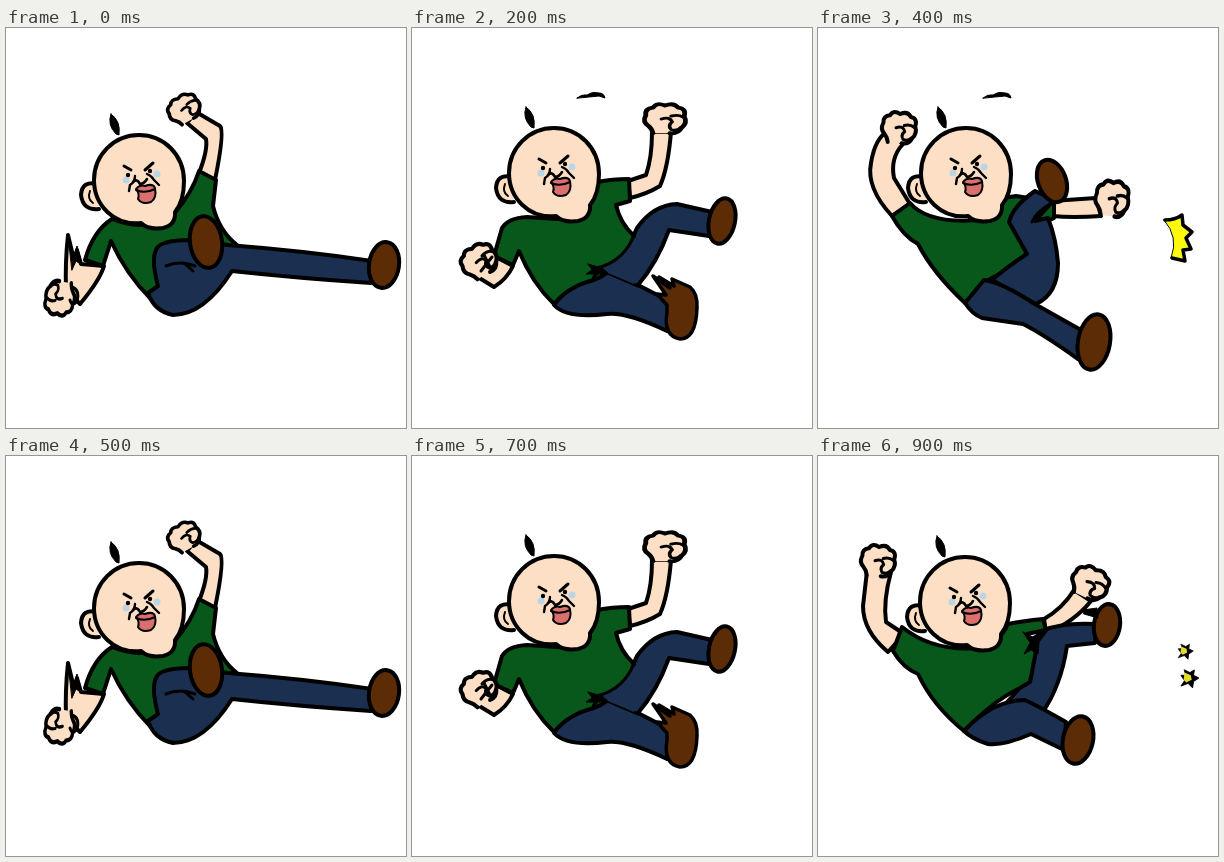
Write an HTML page that moves like this. It is 400x400 px and loops after 1 s.

```html
<!DOCTYPE html>
<html>
<head>
<meta charset="utf-8">
<style>
html, body { margin: 0; width: 100%; height: 100%; overflow: hidden; background: #fff; }
svg { display: block; width: 100vw; height: 100vh; }
</style>
</head>
<body>
<svg id="stage" viewBox="0 0 400 400" stroke="#000" stroke-width="4" stroke-linejoin="round" stroke-linecap="round"></svg>
<script>
const SKIN = '#fddfc6', SHIRT = '#07581a', JEANS = '#1b3050', SHOE = '#5b2c06', YELLOW = '#fdf90c';

const shape = (fill, d, width = 4) => `<path d="${d}" fill="${fill}" stroke-width="${width}"/>`;
const line = (d, width = 3) => shape('none', d, width);
const ink = d => shape('#000', d, 1);
const shoe = (x, y, rx, ry, turn) =>
  `<ellipse rx="${rx}" ry="${ry}" fill="${SHOE}" transform="translate(${x} ${y}) rotate(${turn})"/>`;
// Knuckles point up, the wrist is open below; sx and sy stretch the fist.
const fist = (x, y, turn, sx = 1, sy = 1) =>
  `<g transform="translate(${x} ${y}) rotate(${turn}) scale(${sx} ${sy})">` +
  shape(SKIN, 'M-10 15Q-11 10-14 7Q-19 3-16-4Q-17-11-10-12Q-7-18 0-14Q7-18 11-12Q18-11 16-3Q19 4 14 9Q11 16 4 15') +
  line('M-3 0Q4-3 6 3Q2 7 5 11Q10 13 13 9M5-3Q11-5 15-2') + '</g>';

// Head drawn around its centre; every pose only shifts it.
const head = (x, y) => `<g transform="translate(${x} ${y})">` +
  shape(SKIN, 'M-41 4Q-57 0-58 15Q-56 31-40 29') + line('M-49 11Q-52 19-46 23', 2) +
  ink('M-28-66Q-18-59-20-45L-23-46Q-32-55-28-66Z') +
  shape(SKIN, 'M0-45C25-45 45-25 45 1C45 16 41 26 36 32Q37 45 24 48Q9 50 2 43C-25 46-45 25-45 0C-45-25-25-45 0-45Z') +
  `<g fill="#bcd5e4" stroke="none"><circle cx="-13" cy="0" r="3.5"/><circle cx="18" cy="-6" r="3.5"/></g>` +
  line('M-15-14L-8-10M6-10L14-17') +
  `<g stroke="none"><circle cx="-11" cy="-5" r="2.2"/><circle cx="11" cy="-9" r="2.2"/></g>` +
  line('M-4-4Q-4 2-9 5L-10 11M8-6Q13-4 15 0L20 5', 2.4) +
  line('M-6 2Q-2-2 1 4Q5 4 8-1', 2.6) +
  shape('#d9706e', 'M-3 9Q1 4 6 6Q14 3 16 8Q18 18 12 22Q3 25-1 19Q1 14-3 9Z', 2) +
  line('M-3 10Q6 14 16 9', 2) + '</g>';

const burstLow = shape(YELLOW, 'M39 365Q56 359 67 346Q78 362 100 368L102 385L90 376Q84 378 81 384L75 376Q64 376 56 381Q57 370 39 365Z', 1) +
  line('M67 346Q56 359 39 365Q57 370 56 381Q64 376 75 376L81 384Q84 378 90 376L102 385L100 370');
const burstRight = shape(YELLOW, 'M346 192Q357 192 364 187L365 197L374 204L368 210L373 221L365 222L367 233L353 230Q361 209 346 192Z', 1) +
  line('M347 192Q357 192 364 187L365 197L374 204L368 210L373 221L365 222L367 233L354 230', 3.5);
const spark = (x, y, s) => `<g transform="translate(${x} ${y}) scale(${s})">` +
  ink('M-5-9L1-6L6-9L5-3L11 0L5 4L4 11L-1 6L-9 9L-5 3L-9-3L-4-3Z') +
  `<path d="M-5-6L2-3L3 2L-3 5L-6 2Z" fill="#e2dd28" stroke="none"/></g>`;
const speck = ink('M165 70Q170 66 175 67Q180 63 187 65Q192 65 193 70L187 68L177 69Z');

const kick =
  shape(SKIN, 'M62 207L68 232L71 222L75 236L98 238Q94 252 74 276L60 262Q59 235 62 207Z') +
  ink('M62 207L67 232L71 218L76 237L70 233L66 242Z') +
  shape(SKIN, 'M193 145Q202 122 200 111L181 95L190 84L214 98Q219 103 209 152Z') +
  shape(SHIRT, 'M106 191Q87 203 79 232L97 238L105 213Q120 246 144 270L165 240L231 217Q213 203 207 178L210 152L193 143Q186 165 168 186Q140 205 106 191Z') +
  shape(JEANS, 'M142 265L152 258Q145 232 150 222Q153 212 185 212L222 217Q300 223 366 233L365 255Q290 250 226 243Q198 287 167 287Q148 283 142 265Z') +
  line('M160 238Q174 232 189 238M178 235L187 243') +
  shoe(200, 214, 16, 26, -8) + shoe(378, 237, 15, 23, 8) +
  fist(54, 270, 190, .85, 1.1) + line('M66 259Q74 262 71 273Q66 280 64 272') + fist(178, 81, -30, .95, .85) + head(133, 152);

const punchLow =
  shape(SKIN, 'M85 240Q78 262 77 287L98 289Q101 265 103 243Z') +
  shape(SKIN, 'M194 143Q203 124 201 113L183 110L186 92L216 96Q225 103 211 152Z') +
  shape(SHIRT, 'M100 193Q88 212 85 240L103 244L107 234Q118 250 133 263L160 240L231 219Q213 203 207 178L210 151L192 142Q184 165 166 187Q135 206 100 193Z') +
  shape(JEANS, 'M132 261Q138 282 152 287Q168 292 185 287Q206 276 222 246L331 260L333 229L231 219L175 211Q140 216 138 235Z') +
  line('M160 241Q170 236 188 237M138 238Q138 254 155 275') +
  shoe(191, 216, 17, 27, -10) + shoe(341, 238, 14, 25, 2) +
  fist(85, 304, 180, .95, 1.25) + line('M96 285Q106 288 104 299Q98 307 95 300') + fist(175, 93, -50, 1.1, .9) + head(128, 153);

const tumble =
  shape(SKIN, 'M82 228L101 238Q95 251 82 259L64 248L76 225Z') +
  shape(SKIN, 'M216 153L234 147Q240 130 240 104L259 104Q256 140 248 158Q235 166 218 170Z') +
  shape(JEANS, 'M188 240Q215 225 225 200Q241 177 265 176L300 184L297 208Q277 205 257 202Q245 235 226 257L257 273L255 303Q215 284 195 286Q155 291 142 277Q160 252 188 240Z') +
  shape(SHIRT, 'M115 189Q96 190 90 200L82 228L101 237L107 223Q120 255 142 276Q157 258 182 252Q211 240 222 208Q208 195 204 177L218 173L217 151Q200 151 185 154Q180 188 160 192Z') +
  line('M184 240L226 258') +
  shape(JEANS, 'M184 240Q211 234 222 209L236 225L222 256Z', 0) + line('M184 240Q214 234 225 200') +
  ink('M176 236L190 240L196 245L186 246L178 255L182 246L174 246L180 242Z') +
  shoe(310, 193, 13, 23, 12) +
  shape(SHOE, 'M255 277L245 266L254 267L241 248L258 260L247 249L262 258L260 251L278 259Q286 266 285 280Q284 311 268 311Q251 308 255 284Z', 3.5) +
  fist(67, 233, -30, 1.05, 1) + line('M72 227L80 243M80 229L69 243') + fist(253, 91, 0, 1.2, .95) + head(142, 145);

const punchRight =
  shape(SKIN, 'M74 188Q48 160 53 135Q57 110 70 103L85 116Q72 130 76 150L92 176Z') +
  shape(SKIN, 'M234 173L278 170L283 188Q255 190 234 188Z') +
  shape(SHIRT, 'M92 175L74 188Q85 208 100 216Q115 245 147 275L170 252Q195 240 212 222L215 200L236 190L236 174L198 168L185 170Q180 190 160 192Q110 196 92 175Z') +
  shape(JEANS, 'M217 163Q195 178 191 194L209 226Q190 238 174 252Q196 265 218 276Q240 266 240 235Q238 210 230 190L217 193L236 172Z') +
  line('M232 176Q218 184 214 194') +
  shape(JEANS, 'M147 275L166 252Q185 255 215 275L263 302L260 331Q225 306 205 296L164 290Q154 286 147 275Z') +
  shoe(234, 153, 14, 22, -20) + shoe(276, 314, 16, 28, 10) +
  fist(81, 100, 5) + fist(294, 171, 5, .97, 1.15) + head(148, 145);

const recoil =
  shape(SKIN, 'M70 196Q45 175 45 150L49 115L73 116Q65 145 68 166L86 178Z') +
  shape(SKIN, 'M226 163Q245 152 256 134L273 145Q255 167 228 177Z') +
  shape(JEANS, 'M200 234L210 198L222 175Q245 166 278 168L277 187L249 190Q243 230 224 257L205 250L180 256Z') +
  shape(SHIRT, 'M84 171L75 195Q85 212 100 218Q115 250 146 275Q175 245 202 232L212 226L219 190L209 178L228 174L225 163Q205 165 190 168Q180 190 160 192Q115 196 84 171Z') +
  shape(JEANS, 'M146 275Q175 244 207 244Q220 250 248 266L246 294L213 278Q185 290 170 288Q154 283 146 275Z') +
  ink('M205 176L214 181L231 173L221 186L220 198L213 194L206 198L212 187Z') +
  shoe(289, 169, 13, 21, 8) + ink('M265 154L279 152L280 162L266 158Z') + shoe(260, 284, 15, 24, 12) +
  fist(60, 105, 5) + fist(272, 127, 25, 1.08, 1) + head(147, 146);

const steps = [
  kick,
  punchLow + burstLow + speck,
  tumble + speck,
  recoil + speck,
  punchRight + burstRight + speck,
  kick,
  punchLow + burstLow,
  tumble,
  punchRight + burstRight,
  recoil + spark(367, 195, .75) + spark(371, 222, .9)
];

const stage = document.getElementById('stage');
let shown = -1;
function draw(now) {
  const step = Math.floor(now / 100) % steps.length;
  if (step !== shown) stage.innerHTML = steps[shown = step];
  requestAnimationFrame(draw);
}
draw(performance.now());
</script>
</body>
</html>
```
